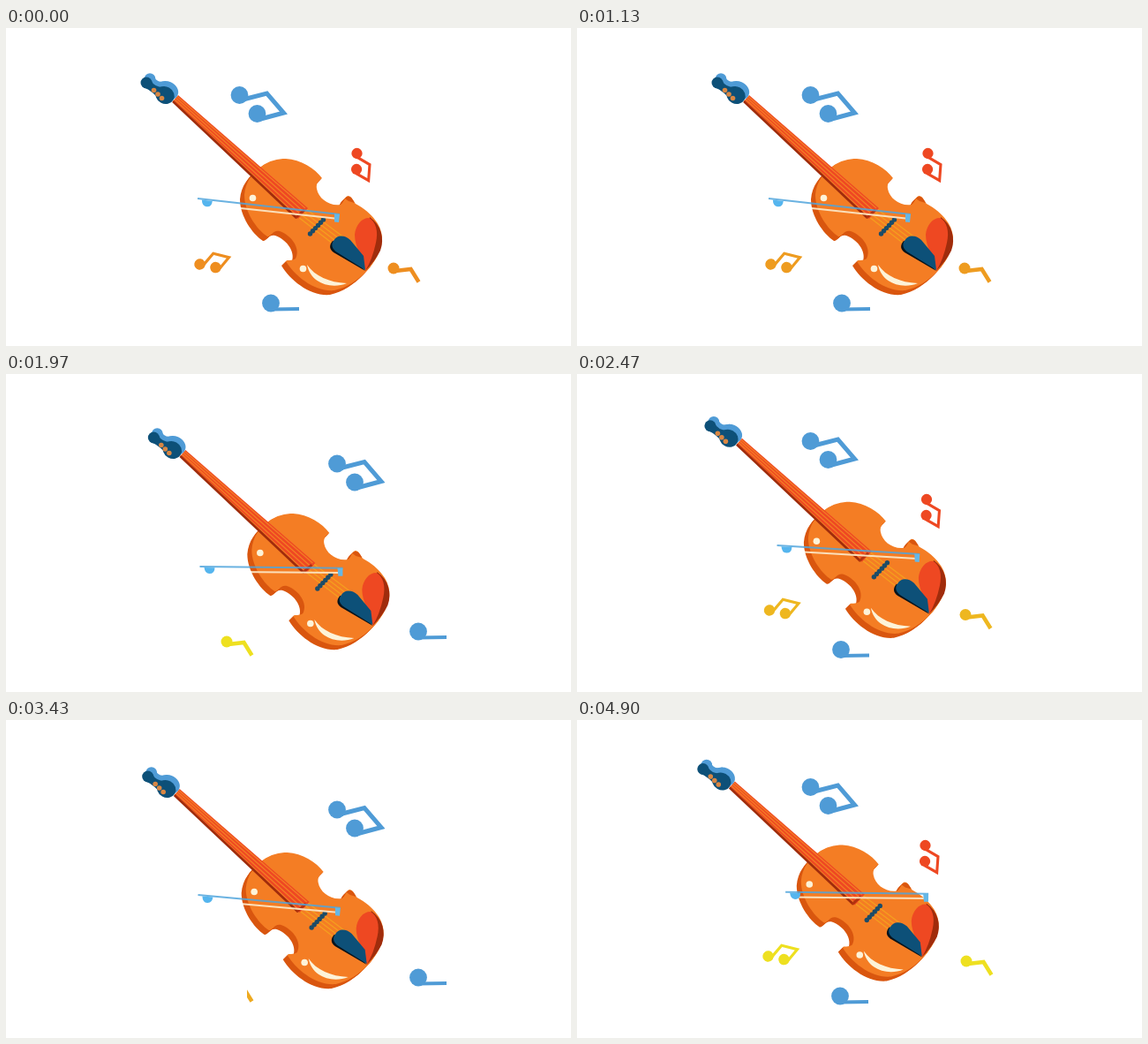
These frames come from a looping animation (640x360 px, 5000 ms). An HTML page with a canvas:

```html
<!DOCTYPE html>
<html lang="en">
<head>
<meta charset="utf-8">
<title>Violin and notes</title>
<style>
  html, body { margin: 0; width: 100%; height: 100%; overflow: hidden; background: #fff; }
  canvas { display: block; width: 640px; height: 360px; }
</style>
</head>
<body>
<canvas id="stage" width="640" height="360"></canvas>
<script>
const ctx = document.getElementById('stage').getContext('2d');
const LOOP = 5000, CYCLE = 17;
const BLUE = '#4f9bd6', NAVY = '#0d5078', RED = '#ee4822', ORANGE = '#f47d24',
      SIDE = '#d9560f', MAROON = '#a02c0c', CREAM = '#fdf3d8';

// Key poses of the sway: violin offset, bow tip, bow frog.
const REST = [0, 0, 217, 193, 378, 211];
const HIGH = [-36.5, -14.6, 260, 197, 423, 179];
const LOW = [10, 12, 220, 223, 382.5, 221.5];

const BODY = new Path2D(`M289 157C298 150 308 148 317 148C334 149 350 159 358 170
  C354 173 351 176 352 182C354 193 366 202 379 200C382 199 383 192 387 190
  C392 190 393 196 396 199C415 209 427 225 426 240C425 262 400 291 372 297
  C350 299 327 281 317 264C318 262 324 264 328 261C334 250 324 235 310 230
  C302 228 300 237 296 236C284 228 270 208 270 189C271 174 280 163 289 157Z`);

const mix = (a, b, f) => a.map((v, i) => v + (b[i] - v) * f);

function pose(p) {
  if (p < 4.5) return mix(REST, HIGH, p / 4.5);
  if (p < 10) return mix(HIGH, LOW, (p - 4.5) / 5.5);
  return mix(LOW, REST, Math.min((p - 10) / 6, 1));
}

// Orange warms quickly to yellow and returns slowly.
const gold = p => `hsl(${32 + 24 * Math.min(1, p / 2, (CYCLE - p) / 6)}, 86%, 53%)`;

function fill(path, color) {
  ctx.fillStyle = color;
  ctx.fill(typeof path === 'string' ? new Path2D(path) : path);
}

function line(points, width, color) {
  ctx.beginPath();
  for (let i = 0; i < points.length; i += 2) ctx.lineTo(points[i], points[i + 1]);
  ctx.lineWidth = width;
  ctx.strokeStyle = color;
  ctx.stroke();
}

function oval(x, y, rx, color, ry = rx, turn = 0) {
  ctx.beginPath();
  ctx.ellipse(x, y, rx, ry, turn, 0, 2 * Math.PI);
  ctx.fillStyle = color;
  ctx.fill();
}

function at(x, y, draw, degrees = 0, scale = 1) {
  ctx.save();
  ctx.translate(x, y);
  ctx.rotate(degrees * Math.PI / 180);
  ctx.scale(scale, scale);
  draw();
  ctx.restore();
}

function drawScroll() {
  oval(163, 57.5, 6.3, BLUE);
  oval(182.5, 71, 13, BLUE, 10.5, 0.4);
  fill('M160 64L168 55Q171 63 181 60L176 74Z', BLUE);
  oval(159, 62, 6.5, NAVY);
  oval(180, 76, 11, NAVY, 9.8, 0.5);
  fill('M156 67L164 59Q168 67 178 67L175 83Q167 72 156 67Z', NAVY);
  for (let i = 0; i < 3; i++) oval(167.5 + 4.5 * i, 70.5 + 4.5 * i, 2.8, '#d98744');
}

function drawNeck() {
  fill('M195 76L342 204L331 216L189 83Z', RED);
  for (let i = 0; i < 4; i++) {
    line([194 - 1.5 * i, 77.5 + 1.7 * i, 339 - 3 * i, 204 + 3 * i], 1.3, ORANGE);
  }
  line([189, 83, 329, 215], 2.6, MAROON);
  line([328, 215, 338, 206], 3, '#b2330f');
}

function drawViolin() {
  for (let i = 5; i > 0; i--) at(-i, i, () => fill(BODY, SIDE));
  fill(BODY, ORANGE);
  fill('M384 193C388 188 392 192 395 198L388 196Z', SIDE);
  fill('M412 214C425 223 429 238 424 252Q418 264 407 275Z', MAROON);
  fill('M411 215C419 219 422 230 419 243Q415 262 407 275C404 258 395 249 395 234C396 223 403 215 411 215Z', RED);

  oval(279.5, 192.5, 3.8, CREAM);
  oval(336.5, 272.5, 3.8, CREAM);
  fill('M341 268C350 281 366 288 386 289C368 296 345 289 341 268Z', CREAM);

  for (let i = 0; i < 4; i++) {
    line([331 + 3 * i, 214 - 3 * i, 370 + 4 * i, 244 - 2.5 * i], 1.2, '#f5a01e');
  }
  for (let i = 0; i < 6; i++) oval(344.5 + 3 * i, 233 - 3.2 * i, 2.7, '#1c4c68');
  fill('M370 241C366 246 366 250 371 254L407 275L380 245Z', '#06131c');
  fill('M371 241C375 234 383 234 390 240L405 258L407 274L375 254C369 250 368 245 371 241Z', NAVY);

  drawNeck();
  drawScroll();
}

function drawBow(x, y, endX, endY) {
  at(x, y, () => {
    ctx.rotate(Math.atan2(endY - y, endX - x));
    // The pale hair shows only against the violin.
    ctx.globalCompositeOperation = 'source-atop';
    line([5, 5.7, 159, 5.2], 2, '#fbdfba');
    ctx.globalCompositeOperation = 'source-over';
    line([0, 0, 162, 0], 2, 'rgba(80, 165, 220, 0.85)');
    fill('M5 1H17Q17 8 11 8Q6 8 5 1Z', '#55b5ee');
    fill('M156 0H162V9H157Z', '#65b7e6');
  });
}

// Each note is drawn around the centre of its first head.
function pair(color) {
  line([4, 5, 31, -2, 50, 20, 24, 27], 5, color);
  oval(0, 0, 9.9, color);
  oval(20, 21, 9.9, color);
}

function flatNote() {
  line([0, 7, 32, 6.5], 4, BLUE);
  oval(0, 0, 9.9, BLUE);
}

function bentNote(color) {
  line([2, 3, 19.5, 1, 28.5, 15.5], 4.5, color);
  oval(0, 0, 6.5, color);
}

function drawNotes(p) {
  const color = gold(p);
  const bluePair = () => pair(BLUE), redPair = () => pair(RED),
        goldPair = () => pair(color), bent = () => bentNote(color);

  if (p >= 4 && p < 10) {
    const d = p - 7;
    at(437, 211, bluePair);
    at(179, 178, flatNote);
    at(392, 324, bent);
    at(316.5 + 4 * d, 110.5, redPair, -6, 0.63);
    at(297 - 4 * d, 328, goldPair, -87, 0.63);
  } else if (p >= 10 && p < 16) {
    at(375, 101.5, bluePair);
    at(467, 291.5, flatNote);
    // The small note is wiped away from its head to its tail.
    at(250, 303, () => {
      ctx.beginPath();
      ctx.rect(Math.max(0, p - 12) * 10 - 7, -10, 60, 40);
      ctx.clip();
      bent();
    });
  } else {
    const d = p % 16;
    at(264.5, 76, bluePair);
    at(300 - d, 311.5 + d / 2, flatNote);
    at(439 + d, 272 + d / 2, bent);
    at(397.5 - 1.5 * d, 142, redPair, 45, 0.62);
    at(219.5 - 1.5 * d, 267.5, goldPair, -35, 0.63);
  }
}

// Ten poses share each 700 ms; the first is held longer.
function poseIndex(t) {
  const u = t % 700;
  return Math.floor(t / 700) * 10 + Math.max(0, 1 + Math.floor((u - 96) * 3 / 200));
}

const start = performance.now();

function render() {
  const t = Math.max(0, performance.now() - start) % LOOP;
  const p = poseIndex(t) % CYCLE;
  const [x, y, ...bow] = pose(p);
  ctx.clearRect(0, 0, 640, 360);
  at(x, y, drawViolin);
  drawBow(...bow);
  drawNotes(p);
  requestAnimationFrame(render);
}
render();
</script>
</body>
</html>
```
